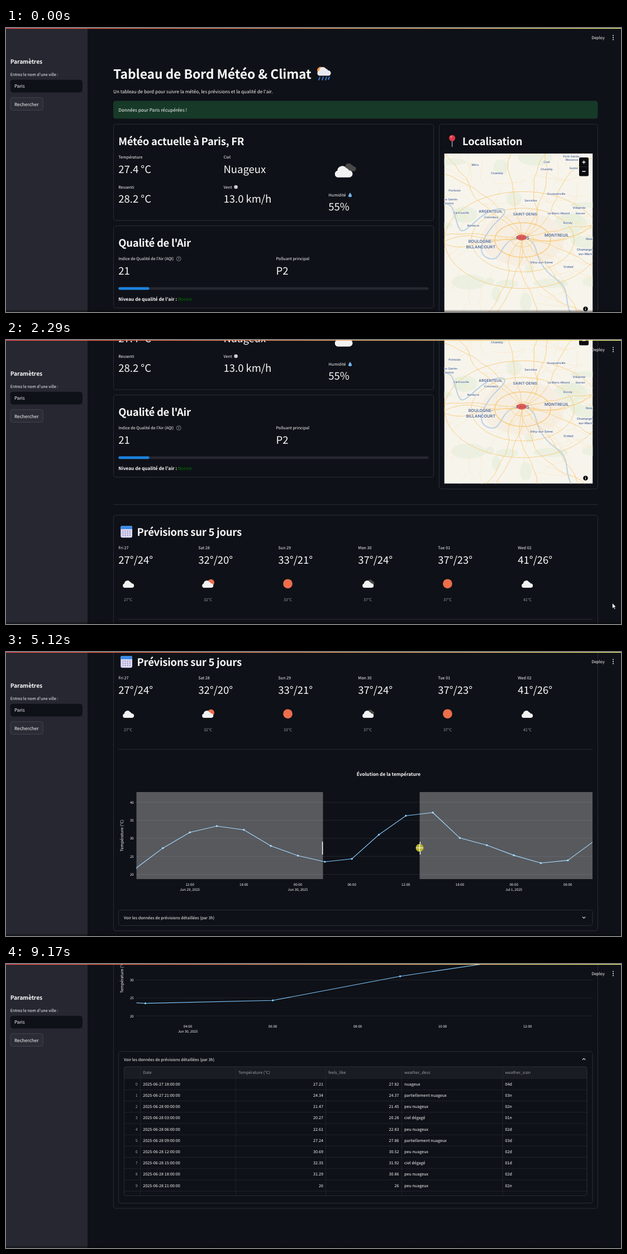
Write an HTML page that moves like this. It is 1101 by 509 pixels and loops after 9.5 s.

```html
<!DOCTYPE html>
<html lang="fr">
<head>
<meta charset="utf-8">
<title>Tableau de Bord</title>
<style>
html, body { margin: 0; width: 100%; height: 100%; overflow: hidden; background: #0e1117; }
svg { display: block; text-rendering: geometricPrecision; }
text { font-family: "Noto Sans CJK JP", "Noto Sans CJK SC", "Noto Sans", sans-serif; white-space: pre; }
.map text { font-family: Inter, "Open Sans", sans-serif; font-weight: 600; }
</style>
</head>
<body>
<svg id="stage" width="1101" height="509" viewBox="0 0 1101 509"></svg>
<script>
const LOOP = 9500, EM = 0.5133;          // EM: one page pixel as a font size on the stage
const FG = '#fafafa', MUTED = '#9c9da2', LINE = '#3a3c44', RED = '#ff4b4b';

// ---- drawing helpers -------------------------------------------------
const text = (x, y, s, size = 14, attrs = '') =>
  `<text x="${x}" y="${y}" font-size="${(size * EM).toFixed(2)}" fill="${FG}" ${attrs}>${s}</text>`;
const bold = (x, y, s, size, spacing = 0, attrs = '') =>
  text(x, y, s, size, `font-weight="700" letter-spacing="${spacing}" ${attrs}`);
const heading = (x, y, s) => bold(x, y, s, 36, -0.25);
const box = (x, y, x2, y2, fill, r = 0, stroke = 'none') =>
  `<rect x="${x}" y="${y}" width="${x2 - x}" height="${y2 - y}" rx="${r}" fill="${fill}" stroke="${stroke}" stroke-width=".7"/>`;
const card = (x, y, x2, y2) => box(x, y, x2, y2, 'none', 4.5, LINE);
const dot = (x, y, r, fill) => `<circle cx="${x}" cy="${y}" r="${r}" fill="${fill}"/>`;
const path = (d, stroke, w = 1, attrs = '') =>
  `<path d="${d}" fill="none" stroke="${stroke}" stroke-width="${w}" ${attrs}/>`;
const shape = (d, fill, attrs = '') => `<path d="${d}" fill="${fill}" ${attrs}/>`;
const rule = (x, x2, y, color = LINE) => path(`M${x} ${y}H${x2}`, color, 0.7);
const cloud = (x, y, w, fill = '#f2f2f2') =>
  shape('M6 21A6 6 0 0 1 6 9.5A8.5 8.5 0 0 1 21.5 5A6 6 0 0 1 26 9A6 6 0 0 1 27 21Z', fill,
    `transform="translate(${x} ${y}) scale(${w / 33})"`);
const metric = (x, y, label, value) => text(x, y, label) + text(x, y + 25.7, value, 36);
const drop = (x, y) => shape(`M${x} ${y - 4}Q${x + 6} ${y + 4} ${x} ${y + 4}T${x} ${y - 4}Z`, '#72b5ee');

// ---- map ---------------------------------------------------------------
let seed = 11;
const rand = () => (seed = (seed * 16807) % 2147483647) / 2147483647;

function wander(x, y, angle, steps, length) {
  let d = `M${x.toFixed(1)} ${y.toFixed(1)}`;
  for (let i = 0; i < steps; i++) {
    angle += (rand() - 0.5) * 0.7;
    x += Math.cos(angle) * length;
    y += Math.sin(angle) * length * 0.8;
    d += `L${x.toFixed(1)} ${y.toFixed(1)}`;
  }
  return d;
}

function townMap() {
  let s = box(784.5, 225, 1050.5, 513.5, '#f7f4ec');
  for (let i = 0; i < 22; i++)
    s += `<ellipse cx="${784 + rand() * 266}" cy="${225 + rand() * 288}" rx="${8 + rand() * 24}" ry="${5 + rand() * 12}" fill="#e6eedb" opacity=".6"/>`;
  s += `<ellipse cx="925" cy="378" rx="75" ry="48" fill="#f6eee2"/>`;
  s += path('M1012 514C998 490 1012 468 985 450S952 410 948 395S925 368 904 380S886 422 862 412S858 366 884 342S874 318 846 342S814 374 806 344S796 318 784 314', '#b9d2e4', 2);
  for (let i = 0; i < 85; i++)
    s += path(wander(784 + rand() * 266, 225 + rand() * 288, rand() * 6.28, 7, 8), '#fae5b9', 0.6);
  for (let i = 0; i < 18; i++)
    s += path(wander(925, 377, i * 0.349, 20, 16), '#f8cf85', 1);
  for (const r of [20, 50, 92, 140])
    s += `<ellipse cx="925" cy="380" rx="${r}" ry="${r * 0.62}" fill="none" stroke="#f7cb7c" stroke-width="${r === 50 ? 1.5 : 0.9}"/>`;

  const label = (x, y, name, size = 5.1, anchor = 'middle') =>
    `<text x="${x}" y="${y + size * 0.36}" font-size="${size}" text-anchor="${anchor}" fill="#4a6088" stroke="#fff" stroke-width=".8" paint-order="stroke">${name}</text>`;
  const towns = [
    [1013, 230, 'Pont-Sainte-'], [1013, 236, 'Maxence'], [968, 240, 'Creil'], [1016, 251, 'Senlis'],
    [968, 253.5, 'Chantilly'], [840, 245, 'Méru'], [879, 260, 'Chambly'], [803, 291, 'Pontoise'],
    [795, 307, 'ans-Sainte-'], [792, 314, 'onorine'], [985, 297, 'Goussainville'], [939.5, 309.5, 'Sarcelles'],
    [1026, 322, 'Villepinte'], [868.5, 339, 'Colombes'], [989.5, 332.5, 'Le Blanc-Mesnil'], [1028, 332.5, 'Sevran'],
    [815, 331.5, 'Sartrouville'], [836.5, 354, 'Nanterre'], [1006, 349, 'Bondy'], [958.5, 420.5, 'Vitry-sur-Seine', 5.5],
    [1007, 428.5, 'Créteil', 5.5], [867.5, 328.5, 'ARGENTEUIL', 6.7], [929.5, 334, 'SAINT-DENIS', 6.7],
    [986, 371, 'MONTREUIL', 7.4], [850, 382, 'BOULOGNE-', 7.4], [850, 392, 'BILLANCOURT', 7.4], [925, 376, 'PARIS', 8.4],
    [1038, 378, 'Noisy', 5.5, 'start'], [1022, 397, 'Champigny-', 5.5, 'start'], [1025, 405, 'sur-Marne', 5.5, 'start']
  ];
  s += towns.map(town => label(...town)).join('');
  s += '<ellipse cx="923" cy="375.3" rx="9" ry="5.4" fill="#e0453f" opacity=".8"/>';
  s += box(1026, 232, 1043, 265.5, '#0b0c10', 2.5) + rule(1026, 1043, 248.8, '#33353c');
  s += path('M1031.5 240.5h6M1034.5 237.5v6M1031.5 257h6', '#fff', 1.3);
  s += dot(1037.5, 503.5, 4.3, '#0b0c10') + path('M1037.5 502.8v3M1037.5 500.8v1', '#fff', 1.1);
  return `<g class="map" clip-path="url(#mapClip)">${s}</g>`;
}

// ---- page sections -------------------------------------------------------
function currentWeather() {
  return bold(192, 90.5, 'Tableau de Bord Météo &amp; Climat', 44.6, -0.1) +
    dot(563.5, 76, 6.5, '#f5964a') + cloud(556, 69, 26, '#e9e9f0') +
    path('M562 88l-2 5M568 88l-2 5M574 88l-2 5M579 88l-2 4', '#3f86dd', 1.8, 'stroke-linecap="round"') +
    text(192, 117, "Un tableau de bord pour suivre la météo, les prévisions et la qualité de l'air.", 16) +
    box(192, 130.5, 1059.5, 162.5, '#173928', 4.5) +
    text(201.3, 150, 'Données pour Paris récupérées !', 16) +
    card(192.4, 172.4, 765.6, 345) + heading(201.3, 210, 'Météo actuelle à Paris, FR') +
    metric(201.3, 234.3, 'Température', '27.4 °C') + metric(389.5, 234.3, 'Ciel', 'Nuageux') +
    metric(201.3, 287.5, 'Ressenti', '28.2 °C') + metric(389.5, 287.5, 'Vent', '13.0 km/h') +
    metric(577.3, 301.7, 'Humidité', '55%') + drop(616, 299) +
    dot(411.5, 285, 3.3, '#d5d7db') + path('M408 283l2 1M408 287l3-1M413 287l2 1', '#6b6f78', 0.7) +
    cloud(603, 241.5, 24, '#484848') + cloud(587, 246, 34);
}

function airQuality() {
  return card(192.4, 354.5, 765.6, 501.8) + heading(201.3, 392, "Qualité de l'Air") +
    metric(201.3, 416.2, "Indice de Qualité de l'Air (AQI)", '21') +
    metric(483.5, 416.2, 'Polluant principal', 'P2') +
    `<circle cx="309.2" cy="413.6" r="3.9" fill="none" stroke="${MUTED}" stroke-width=".8"/>` +
    text(309.2, 415.8, '?', 11, 'text-anchor="middle"') +
    box(201.3, 464.5, 756.6, 469.3, '#262730', 2.4) + box(201.3, 464.5, 256.6, 469.3, '#1c83e1', 2.4) +
    bold(201.3, 488.9, `Niveau de qualité de l'air : <tspan fill="#007000" font-weight="400">Bonne</tspan>`, 16);
}

function mapCard() {
  return card(775.4, 172.4, 1059.4, 523) +
    path('M798.7 201V213', '#a9adb5', 1.3) + dot(798.7, 197.3, 5.6, '#dc3a4a') + dot(797, 195, 1.4, '#f08a90') +
    heading(817, 210, 'Localisation') + townMap();
}

function forecast() {
  let s = rule(192, 1059.5, 550.8) + heading(234.5, 607, 'Prévisions sur 5 jours') +
    box(205.3, 589, 226, 610.3, '#dcd8f0', 3) + shape('M205.3 595v-3a3 3 0 0 1 3-3h14.7a3 3 0 0 1 3 3v3z', '#3d8ae6');
  for (let i = 0; i < 12; i++) s += dot(209.5 + (i % 4) * 4.1, 598.5 + (i / 4 | 0) * 3.8, 1, '#8a7fc0');
  const days = [['Fri 27', 27, 24], ['Sat 28', 32, 20], ['Sun 29', 33, 21], ['Mon 30', 37, 24], ['Tue 01', 37, 23], ['Wed 02', 41, 26]];
  days.forEach(([day, max, min], i) => {
    const x = 201.3 + 143 * i, mid = x + 17.2, y = 692.8;
    s += metric(x, 631.4, day, `${max}°/${min}°`);
    if (i === 1) s += dot(mid + 5.5, y - 2, 6, '#ec6e4c');
    if (i === 3) s += cloud(mid - 2, y - 8, 14, '#484848');
    s += i === 2 || i === 4 ? dot(mid, y, 8.4, '#ec6e4c') : cloud(mid - (i % 3 ? 11.5 : 10.5), y - 6.5, 21.5);
    s += text(mid, 723.7, `${max}°C`, 14, `text-anchor="middle" style="fill:${MUTED}"`);
  });
  return s + rule(201.3, 1050, 756.4) +
    bold(685, 804, 'Évolution de la température', 16.2, 0, 'text-anchor="middle"') +
    text(0, 0, 'Température (°C)', 14, 'text-anchor="middle" transform="translate(210.2 911) rotate(-90)"');
}

// One sample every three hours, starting on June 29 at 06:00.
const temps = [21.7, 27.3, 31.65, 33.4, 32.35, 27.9, 25.2, 23.5, 24.3, 31, 36.25, 37.15, 30.1, 28.1, 25.3, 23.15, 23.9, 29.4];

function chart(left, step, ticks, dates) {
  const xAt = i => left + step * i, yAt = v => 980.6 - (v - 20) * 6.465;
  const centered = 'text-anchor="middle"';
  let s = '';
  for (let v = 20; v <= 40; v += 5)
    s += rule(233.5, 1050, yAt(v), '#2c2f37') + text(228.8, yAt(v) + 2.4, v, 12, 'text-anchor="end"');
  ticks.forEach((i, k) => {
    const hour = String(Math.round(6 + 3 * i) % 24).padStart(2, '0');
    s += text(xAt(i), 1001.2, `${hour}:00`, 12, centered);
    if (dates[k]) s += text(xAt(i), 1010.4, `${dates[k]}, 2025`, 12, centered);
  });
  const points = temps.map((v, i) => [xAt(i), yAt(v)]);
  return s + `<g clip-path="url(#plotClip)">${path('M' + points.join('L'), '#83c9ff', 1.15)}` +
    points.map(([x, y]) => dot(x, y, 1.75, '#83c9ff')).join('') + '</g>';
}

function table() {
  const left = 211.4, right = 1040, top = 1071.6, head = 1092.6, bottom = 1302.6, row = 20.2;
  const grey = `style="fill:${MUTED}"`, end = 'text-anchor="end"';
  const values = [27.21, 24.34, 21.47, 20.27, 22.61, 27.24, 30.69, 32.35, 31.29, 26];
  const felt = [27.82, 24.37, 21.45, 20.28, 22.83, 27.86, 30.52, 31.92, 30.86, 26];
  const skies = { 1: 'ciel dégagé', 2: 'peu nuageux', 3: 'partiellement nuageux', 4: 'nuageux' };
  const columns = [[245.2, 'Date'], [416, 'Température (°C)'], [577, 'feels_like'], [713, 'weather_desc'], [893.6, 'weather_icon']];
  let s = box(left, top, right, head, '#1a1c24', 4);
  for (const [x, name] of columns)
    s += path(`M${x - 4.6} ${top}V${bottom}`, '#2a2c34', 0.7) + text(x, top + 12.8, name, 14, grey);
  [...'4321232122'].forEach((icon, i) => {
    const y = head + i * row, base = y + 12.6, hours = 18 + 3 * i, hour = hours % 24;
    const night = hour > 18 || hour < 6;
    s += rule(left, right, y, '#2a2c34') + text(235.8, base, i, 14, `${grey} ${end}`) +
      text(245.2, base, `2025-06-${27 + (hours / 24 | 0)} ${String(hour).padStart(2, '0')}:00:00`) +
      text(568, base, values[i], 14, end) + text(703.5, base, felt[i], 14, end) +
      text(713, base, skies[icon]) + text(893.6, base, `0${icon}${night ? 'n' : 'd'}`);
  });
  return s + rule(left, right, head + 10 * row, '#2a2c34') + box(left, top, right, bottom, 'none', 4, LINE);
}

function sidebar() {
  return box(0, 0, 146, 509, '#262730') + bold(7.8, 64, 'Paramètres', 20, -0.1) +
    text(7.8, 86, "Entrez le nom d'une ville :") + box(7.8, 92.8, 136.8, 115.4, '#0e1117', 4.5) +
    text(15, 107.4, 'Paris', 16) + box(7.8, 124.8, 66.2, 147.4, '#2b2c36', 4.5, '#50525a') +
    text(15, 139.6, 'Rechercher', 16);
}

const cursors = {
  arrow: shape('M0 0V9.6L2.2 7.5 3.8 11 5.3 10.3 3.8 7H6.6Z', '#fff', 'stroke="#000" stroke-width=".5"'),
  cross: path('M-6.5 0H6.5M0 -6.5V6.5', '#fff', 1.2),
  hand: shape('M-1 0Q0 -1.2 1 0V4.2Q5.6 4 6 6V9.5L4.5 12.5H-1L-4 8.2Q-3.6 6.4 -1 8Z', '#fff', 'stroke="#000" stroke-width=".5"')
};

const stage = document.getElementById('stage');
stage.innerHTML = `<defs>
  <linearGradient id="strip"><stop stop-color="#ff4b4b"/><stop offset="1" stop-color="#fffd80"/></linearGradient>
  <linearGradient id="fade" x2="0" y2="1"><stop stop-color="#000" stop-opacity="0"/><stop offset="1" stop-opacity=".5"/></linearGradient>
  <clipPath id="mapClip">${box(784.5, 225, 1050.5, 513.5, '#000')}</clipPath>
  <clipPath id="plotClip">${box(233.5, 833, 1050, 989, '#000')}</clipPath></defs>
  <g id="page">${currentWeather()}${airQuality()}${mapCard()}${forecast()}
    <g id="wide">${chart(232.5, 48.33, [2, 4, 6, 8, 10, 12, 14, 16], ['Jun 29', , 'Jun 30', , , , 'Jul 1'])}</g>
    <g id="zoomed">${chart(249.5 - 7 * 228.05, 228.05, [22, 24, 26, 28, 30].map(n => n / 3), ['Jun 30'])}</g>
    <path id="shade" fill="#fff" fill-opacity=".3"/><path id="handles" stroke="#fff" stroke-width="1.4"/>
    <rect id="cardFrame" x="192.4" y="570" width="867" rx="4.5" fill="none" stroke="${LINE}" stroke-width=".7"/>
    <rect id="expander" x="201.4" y="1044.4" width="848.6" rx="4.5" fill="none" stroke="${LINE}" stroke-width=".7"/>
    <g id="summary">${text(211, 1061.2, 'Voir les données de prévisions détaillées (par 3h)', 14, 'style="fill:inherit"')}</g>
    <path id="chevron" fill="none" stroke-width="1.1"/>
    <g id="table">${table()}</g></g>
  ${sidebar()}
  ${text(1048.2, 20.2, 'Deploy')}${[13.6, 17.2, 20.8].map(y => dot(1087, y, 1, FG)).join('')}
  ${box(0, 0, 1101, 1.2, 'url(#strip)')}${box(0, 504.5, 1101, 509, 'url(#fade)')}
  <g id="pointer"><circle id="press" r="7" fill="#b5b02a"/>
    ${Object.entries(cursors).map(([name, s]) => `<g id="${name}">${s}</g>`).join('')}</g>`;

// ---- motion ----------------------------------------------------------------
const el = {};
stage.querySelectorAll('g[id], path[id], rect[id], circle[id]').forEach(node => el[node.id] = node);
const show = (name, on) => el[name].setAttribute('display', on ? 'inline' : 'none');
const set = (name, key, value) => el[name].setAttribute(key, value);

// Linear track through [time, ...values] keys.
function track(keys, t) {
  const next = keys.findIndex(key => key[0] > t);
  if (next === 0) return keys[0].slice(1);
  if (next < 0) return keys[keys.length - 1].slice(1);
  const a = keys[next - 1], b = keys[next], p = (t - a[0]) / (b[0] - a[0]);
  return a.slice(1).map((v, i) => v + (b[i + 1] - v) * p);
}

const scrollKeys = [[1489, 0], [1490, 10], [1560, 10], [1660, 90], [1760, 128], [2100, 128], [2290, 256], [2360, 256],
  [2500, 390], [2700, 443], [3029, 443], [3030, 453], [3100, 453], [3240, 530], [3870, 530], [4130, 582],
  [6350, 582], [6600, 643.5], [8100, 643.5], [8300, 800], [8560, 887.5]];
const pointerKeys = [[200, 1090, 503], [540, 1085.5, 471.5], [3870, 1085.5, 471.5], [4300, 880, 400], [4860, 567.5, 351],
  [4920, 590, 351], [5120, 740.5, 351], [6350, 740.5, 351], [6900, 1068, 484], [7280, 1040, 424], [7420, 1036.2, 411.6],
  [8500, 1036.2, 411.6], [9100, 1088, 494]];

function render(t) {
  const [scroll] = track(scrollKeys, t), [x, y] = track(pointerKeys, t);
  const zoomed = t >= 5580, dragging = t >= 4920 && !zoomed;
  const open = t >= 7900, hover = t >= 7350 && t < 8160, extra = open ? 243.9 : 0;
  const overPlot = x > 233.5 && x < 1050 && y > 833 - scroll && y < 989 - scroll;

  set('page', 'transform', `translate(0 ${-scroll})`);
  show('wide', !zoomed);
  show('zoomed', zoomed);

  show('shade', dragging);
  show('handles', dragging);
  if (dragging) {
    set('shade', 'd', `M233.5 833H567.5V989H233.5ZM${x} 833H1050V989H${x}Z`);
    set('handles', 'd', `M566.6 922v23M${x + 1} 922v23`);
  }

  set('cardFrame', 'height', 511.6 + extra);
  set('expander', 'height', 27.9 + extra);
  show('table', open);
  set('summary', 'fill', hover ? RED : FG);
  set('chevron', 'stroke', hover ? RED : FG);
  set('chevron', 'd', t >= 7760 ? 'M1032 1059.3l2.6-2.6 2.6 2.6' : 'M1032 1056.7l2.6 2.6 2.6-2.6');

  show('pointer', t >= 200 && t < 9170);
  set('pointer', 'transform', `translate(${x} ${y})`);
  show('press', dragging);
  show('hand', hover);
  show('cross', overPlot && !hover);
  show('arrow', !overPlot && !hover);
}

(function tick() {
  render(performance.now() % LOOP);
  requestAnimationFrame(tick);
})();
</script>
</body>
</html>
```
